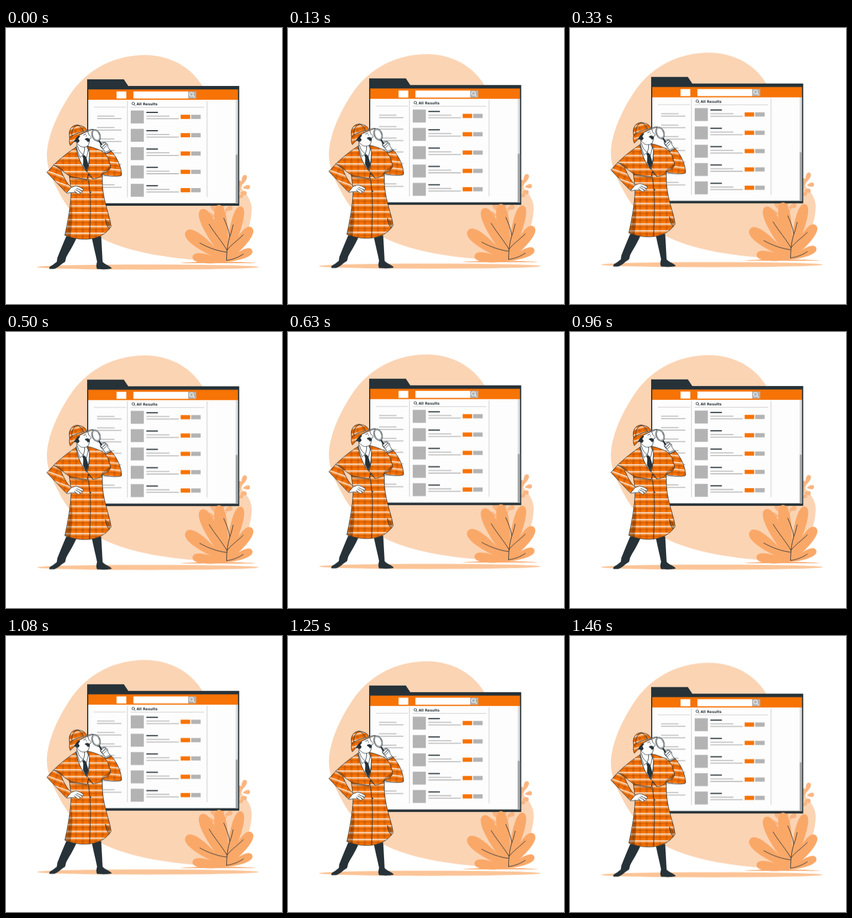
An HTML page that plays this animation: 500 px wide and 500 px high, repeating every 1.5 s.

```html
<!DOCTYPE html>
<html lang="en">
<head>
<meta charset="utf-8">
<title>Detective searching results</title>
<style>
  html, body { margin: 0; width: 100%; height: 100%; overflow: hidden; background: #fff; }
  svg { display: block; width: 100vw; height: 100vh; }
  #scene { animation: float 1.5s linear infinite; }
  @keyframes float {
    0%, 100% { transform: translateY(.5px); }
    50% { transform: translateY(-9.5px); }
  }
  .ink { fill: #263238; }
  .orange { fill: #f77305; }
  .grey { fill: #b3b3b3; }
  .white { fill: #fff; }
  .line { fill: none; stroke: #263238; stroke-width: 1; stroke-linecap: round; stroke-linejoin: round; }
  .edge { stroke: #263238; stroke-width: .9; stroke-linecap: round; stroke-linejoin: round; }
  .shade { fill: #1f1000; opacity: .3; }
  .bar { fill: none; stroke-width: 1.8; stroke: #bcbcbc; }
  .rule { fill: none; stroke: #cbcbcb; stroke-width: 1.1; }
  text { font: 700 6.4px "DejaVu Sans", sans-serif; }
</style>
</head>
<body>
<svg viewBox="0 0 500 500">
  <defs>
    <pattern id="plaid" width="12" height="12.4" patternUnits="userSpaceOnUse" patternTransform="translate(2 9)">
      <rect class="orange" width="12" height="12.4"/>
      <path d="M5 0V12.4" stroke="#b84c00" stroke-width="4" opacity=".42"/>
      <path d="M0 8H12" stroke="#b84c00" stroke-width="3.6" opacity=".35"/>
      <path d="M0 2.6H12" stroke="#fff" stroke-width="1.7"/>
      <path d="M0 5H12" stroke="#fcd3b0" stroke-width=".7"/>
    </pattern>
    <pattern id="plaidLeft" href="#plaid" patternTransform="rotate(20) translate(2 4)"/>
    <pattern id="plaidRight" href="#plaid" patternTransform="rotate(6) translate(2 8)"/>
    <pattern id="plaidHat" href="#plaid" patternTransform="rotate(-14) scale(.85) translate(2 3)"/>
  </defs>

  <g id="scene">
    <path fill="#fbd4b4" d="M252 48.5C300 49 336 72 356 105C384 150 392 258 422 286C438 300 446 316 445 329C444 368 424 402 390 415C370 422 335 420 300 415C255 409 215 400 180 384C145 366 114 332 97 299C84 275 74 254 74 230C75 192 97 147 121 113C152 72 197 49 252 48.5Z"/>
    <ellipse cx="257" cy="432.6" rx="201" ry="4.6" fill="#fbc497"/>

    <g id="sprigs" fill="#f9b581"></g>

    <g id="window">
      <path class="ink" d="M147 92.6H213.5L221.5 104.6H422.5V321.4H147Z"/>
      <path fill="#fdfdfd" d="M149 129H420V317H149Z"/>
      <path class="orange" d="M149 110.7H420.3V129.6H149Z"/>
      <path fill="#dedede" d="M416 129.6H420.3V317H416Z"/>
      <path fill="#a8a8a8" d="M416 229H420.3V317H416Z"/>
      <path class="white" d="M200.3 114.5H218V127.2H200.3ZM230.8 114.5H330V127.2H230.8Z"/>
      <path class="grey" d="M330 114.5H344.6V127.2H330Z"/>
      <g fill="none" stroke="#fff" stroke-width="1.1" stroke-linecap="round">
        <circle cx="336" cy="119.6" r="3.4"/><path d="M338.6 122.2L341.4 125.2"/>
      </g>
      <path class="rule" d="M159 142.7H217.5M225.5 143H359M220 131.5V306M364.2 131.5V306"/>
      <g class="line"><circle cx="230.5" cy="136.4" r="2.3"/><path d="M232.3 138.2L234.3 140.2"/></g>
      <text class="ink" x="236.4" y="139.9">All Results</text>
      <g id="menu"></g>
      <g id="rows"></g>
    </g>

    <path fill="#faa769" d="M315 425.4C345 422.2 425 422.2 453 425.4Z"/>
    <g id="bush" fill="#faa868"></g>
    <path class="line" d="M399.5 420.5C400 400 402 388 406 376C409 368 410 362 411.5 356M394.5 344C399 354 403 364 405.5 377M368 355C379 373 391 386 400.3 402M430 374C419 385 408 392 400.3 402M351 389C367 398 385 404 399.6 405.5M430 409C421 415 411 419 399.5 420.5"/>

    <g id="man">
      <g class="ink">
        <path d="M109 377L128 379C122 394 114 405 109 415L107 423C100 427 93 435 87 436L79 436C77 433.6 80 431 85 428.5L92 423L93 416C98 403 103 391 109 377Z"/>
        <path d="M155 377H172.5L175 423C180 428.5 190 431 191.5 435C186 437 172 437 165 436C163 432 163.6 428 165 423C162 408 158 393 155 377Z"/>
      </g>

      <!-- coat -->
      <path class="edge" fill="url(#plaid)" d="M114 262L118 294C117 324 112 350 106.5 375C120 381 138 383.5 153 381.5C168 380 182 372 190.5 359C188 339 178 319 175 288L174 255Z"/>
      <path class="shade" d="M106.5 375C113 358 117 334 118 310C122 332 120 358 117 378.5Z"/>
      <path class="shade" d="M180 346C181 355 184 362 189 360C189 355 183 346 180 346Z"/>
      <path class="shade" d="M114 264C124 269 136 271 147 272L148 277C136 274 124 274 115.5 272Z"/>
      <path class="line" d="M146 259C152 284 154 312 152.8 340L151.6 381M180 346C181 354 183 360 187 363"/>

      <!-- left arm -->
      <path class="edge" fill="url(#plaidLeft)" d="M87 247L74 261L109 298L119 289C109 280 104 268 99 257L104 250Z"/>

      <!-- right arm -->
      <path class="edge" fill="url(#plaidRight)" d="M180 227L191 222.5C201 234 209 250 209.5 266C204 269.5 187 269 172 264L175 245L189 250Z"/>

      <!-- cape -->
      <path class="edge" fill="url(#plaid)" d="M129 214C114 223 97 237 86 248C96 252 102 259 114 267C124 271 138 272 147 273.5L149 264L157 273C168 272 173 268 173 265C182 261 189 257 189.5 251C187 239 183 228 175 223C167 219 156 215 147 213.5Z"/>
      <path class="shade" d="M189 250C189 256 181 261 173 264C176 257 183 255 189 250Z"/>
      <path class="shade" d="M86 248C94 247 100 250 104 259C98 255 93 251 86 248Z"/>
      <path class="line" d="M127 215C129 232 137 248 146 260M150 220C152 237 150 249 147 260C152 264 154 269 158 273"/>

      <!-- shirt and tie -->
      <path class="white edge" d="M129 213L147 212L151 225C151 240 149 252 146 259C136 248 130 232 127.5 218Z"/>
      <path class="ink" d="M138 231L143.5 229.5L145.5 234L149.5 248L145.5 258.5L139.5 248L140 236Z"/>
      <path class="white edge" d="M129 206L127.7 216L134 234L140 229L146 234L149 220L143 208Z"/>
      <path class="line" d="M140 229C134 225 131 220 129.5 213M140 229C142 224 143 219 142.5 214"/>
      <circle class="ink" cx="149.5" cy="265.5" r="1.3"/>
      <circle class="ink" cx="153.2" cy="297" r="1.3"/>

      <!-- head -->
      <path class="white edge" d="M127 201L134 193L148 186.5L150 193C153 195 155 197 154 199L151 200.5L151.5 205L149 212C145 216 139 216 135 214L128 208Z"/>
      <path class="ink" d="M121 203L131 194.5L134.5 195.5L131 200L133.5 204L130 208L126.5 205.5L123 206Z"/>
      <path class="ink" d="M142.5 201C146 197.5 150 198.5 151.5 201.5C152 203.5 150.5 206.3 148.5 206.2C147 204 145 202.5 142.5 201Z"/>
      <path class="line" d="M140.5 193.5L145 191.5M145.5 194.5V195.5"/>
      <path class="edge" fill="url(#plaidHat)" d="M115.3 199C112 184 119 175.3 129 175.2C139 176 145.5 180.5 146.5 185.5C151 183.5 155 182.7 158.5 183C151 186 139 189 132.5 194C126 199 122.5 208 116.5 212.5C114.2 208 114.4 203 115.3 199Z"/>
      <path class="line" d="M115.3 199C123 190 137 188 146.5 185.5M129 175.2C121 179 118 188 119.5 195M129 175.2C136 178 139 182 140 187"/>

      <!-- magnifier and hand -->
      <path class="white edge" d="M181 227L177 220C172 217 170 213 171 208.5L175 207L179 206.5C183 208 185 211 184.5 215L189.5 222.5Z"/>
      <path class="line" style="stroke-width:2.8" d="M169 204.5L174 212"/>
      <g transform="rotate(-24 163.3 194)">
        <ellipse cx="163.3" cy="194" rx="7.3" ry="11" class="edge" fill="#fff" fill-opacity=".72"/>
        <ellipse cx="163.3" cy="194" rx="5.7" ry="9.3" class="line" style="stroke-width:.7"/>
      </g>
      <path class="white edge" d="M171 213.5L177 207.5C179 206.5 181 208 180 209.5L174.5 215ZM173.5 216L180.5 209.8C182.5 209.5 183.5 211 182.5 212.5L176.5 218Z"/>
      <path class="white edge" d="M180 227L190.5 222L189 220.5L179.5 225Z"/>

      <!-- hand on hip -->
      <path class="white edge" d="M110 298L118 288.5L126 285.5C132 286.5 137 289 140.5 292.5C140 295 137.5 294.5 135.5 293.5L138.5 297C137.5 299 135 298 133 296.2L134.5 299.8C132 301.5 129 299 127 297.5C122 298 116 297 112 298.7Z"/>
      <path class="line" d="M135.5 293.5L128 290M133 296.2L126 292.3M127 297.5L123.5 294.5"/>
    </g>
  </g>
</svg>
<script>
  const fill = (id, html) => { document.getElementById(id).innerHTML = html; };
  const list = (n, fn) => Array.from({ length: n }, (_, i) => fn(i)).join('');

  fill('menu', list(7, i => {
    const y = 159.2 + i * 20.75;
    return `<path class="bar" d="M165 ${y}H196.5M165 ${y + 4.4}H209"/>`;
  }));

  fill('rows', list(5, i => `<g transform="translate(0 ${i * 33.2})">
    <path class="grey" d="M226 149H249.7V172.4H226Z"/>
    <path d="M254.3 152.4H275.2" stroke="#263238" stroke-width="2"/>
    <path class="bar" d="M254.3 159.2H296M254.3 163.9H313"/>
    <path class="orange" d="M316.4 156.7H333.6V164.3H316.4Z"/>
    <path class="grey" d="M335.4 156.7H352.6V164.3H335.4Z"/></g>`));

  // Rounded leaf from a base point to a tip, w = half width of its control hull.
  const leaf = (bx, by, tx, ty, w) => {
    const len = Math.hypot(tx - bx, ty - by);
    const deg = Math.atan2(tx - bx, by - ty) * 180 / Math.PI;
    return `<path transform="translate(${bx} ${by}) rotate(${deg})"
      d="M0 0C${w * .7} ${-len * .3} ${w * 1.5} ${-len} 0 ${-len}C${-w * 1.5} ${-len} ${-w * .7} ${-len * .3} 0 0Z"/>`;
  };

  fill('bush', [
    [326, 368, 14], [338, 414, 10], [354, 328, 14], [385, 320, 13],
    [426, 323, 12], [445, 361, 12], [446, 402, 9]
  ].map(([x, y, w]) => leaf(399.5, 423, x, y, w)).join(''));

  fill('sprigs', [
    [427, 284, 434, 266, 5], [429, 289, 442, 287, 4.5], [424, 298, 436, 299, 4.5],
    [423, 290, 424, 276, 4], [421, 308, 429, 302, 4],
    [384, 336, 372, 320, 5], [380, 342, 363, 336, 5], [392, 332, 392, 314, 5],
    [396, 330, 410, 324, 5], [382, 347, 370, 348, 4]
  ].map(a => leaf(...a)).join('') +
    '<path d="M428 280C424 300 405 322 388 350" fill="none" stroke="#f9b581" stroke-width="1.5"/>');
</script>
</body>
</html>
```
